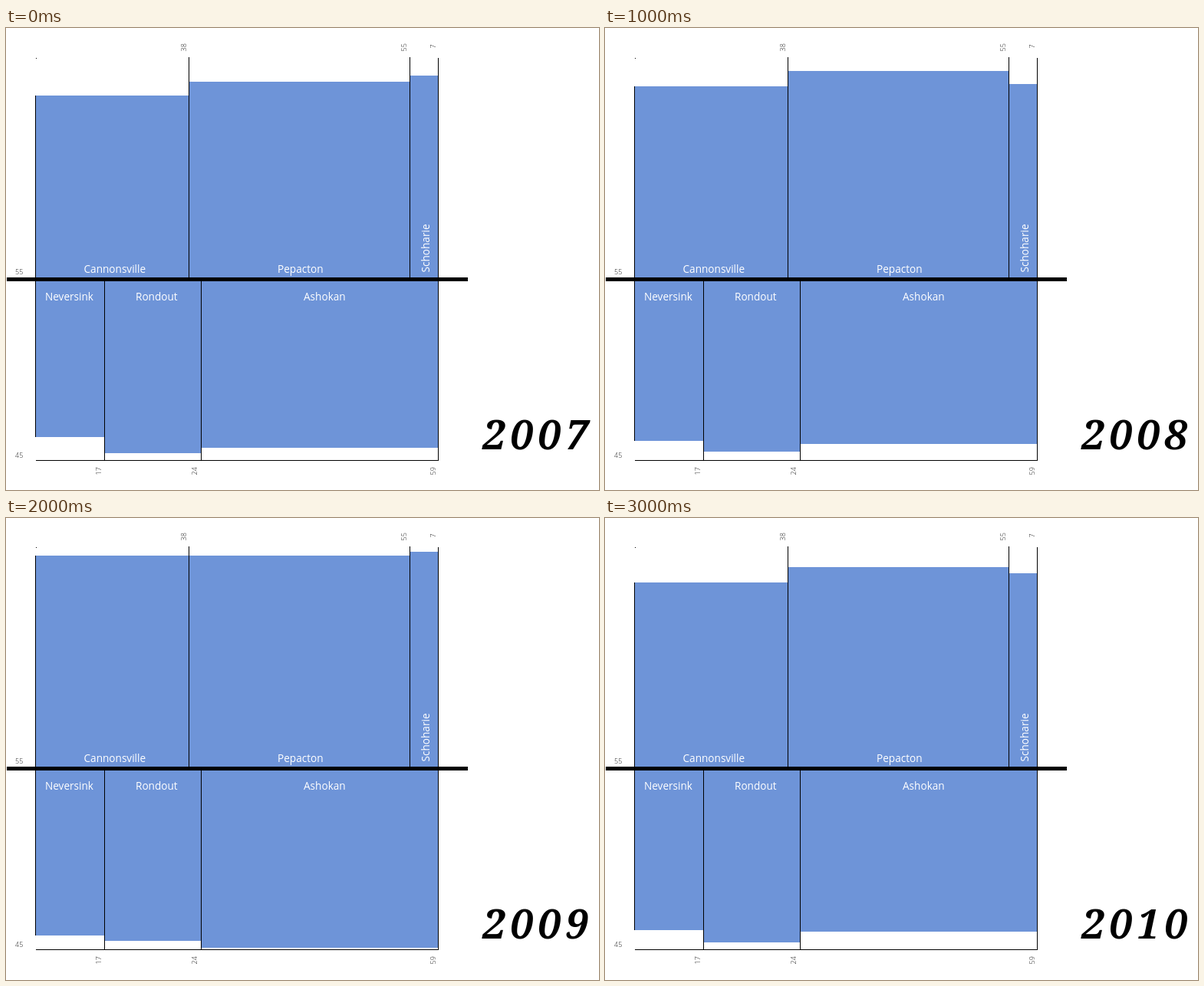
Recreate the animation shown at these times as an HTML page with a canvas. Size 773 by 602 pixels, loop 4 s.

```html
<!DOCTYPE html>
<html lang="en">
<head>
<meta charset="utf-8">
<title>Reservoir levels</title>
<style>
  html, body { margin: 0; width: 100%; height: 100%; overflow: hidden; background: #fff; }
  canvas { display: block; }
</style>
</head>
<body>
<canvas id="stage" width="773" height="602"></canvas>
<script>
const ctx = document.getElementById('stage').getContext('2d');
const HOLD = 1000;
const BLUE = '#6e94d8';
const LABEL = '13.6px "Open Sans", "Noto Sans", sans-serif';
const SMALL = '300 9px "Open Sans", "Noto Sans", sans-serif';
const YEAR = 'italic bold 53px "Noto Serif", "Liberation Serif", serif';

// tops: bar edges above the axis, bottoms: bar edges below it, dy: page offset
const years = [
  { year: 2007, tops: [88, 70, 62], bottoms: [533, 554, 547], dy: 0 },
  { year: 2008, tops: [76, 56, 73], bottoms: [538, 552, 542], dy: 0 },
  { year: 2009, tops: [49, 49, 44], bottoms: [544, 551, 560], dy: -1 },
  { year: 2010, tops: [84, 64, 72], bottoms: [537, 553, 539], dy: -1 }
];
const upperX = [39, 238, 526, 563];
const lowerX = [39, 128, 254, 563];

function box(x0, y0, x1, y1, color = '#000') {
  ctx.fillStyle = color;
  ctx.fillRect(x0, y0, x1 - x0, y1 - y0);
}

function text(str, x, y, font, color, upright = false) {
  ctx.save();
  ctx.translate(x, y);
  if (upright) ctx.rotate(-Math.PI / 2);
  ctx.font = font;
  ctx.fillStyle = color;
  ctx.fillText(str, 0, 0);
  ctx.restore();
}

const label = (str, x, y, upright) => text(str, x, y, LABEL, '#fff', upright);
const small = (str, x, y, upright) => text(str, x, y, SMALL, '#222', upright);

function draw({ year, tops, bottoms, dy }) {
  box(0, 0, 773, 602, '#fff');
  const axis = 327 + dy;
  tops.forEach((y, i) => box(upperX[i], y, upperX[i + 1], axis, BLUE));
  bottoms.forEach((y, i) => box(lowerX[i], axis, lowerX[i + 1], y, BLUE));
  box(38, tops[0], 39, bottoms[0]);

  ctx.save();
  ctx.translate(0, dy);
  for (const x of [238, 526]) box(x, 38, x + 1, 327);
  for (const x of [128, 254]) box(x, 327, x + 1, 563);
  box(563, 39, 564, 564);
  box(39, 563, 564, 564);
  box(39, 39, 40, 40);
  box(1, 325, 602, 330);

  label('Cannonsville', 101.5, 319);
  label('Pepacton', 354, 319);
  label('Schoharie', 552, 318.5, true);
  label('Neversink', 51, 355);
  label('Rondout', 169, 355);
  label('Ashokan', 388, 355);

  small('55', 12, 321);
  small('45', 12, 560);
  small('38', 235, 30.5, true);
  small('55', 522, 30.5, true);
  small('7', 560, 26.5, true);
  small('17', 124, 582.5, true);
  small('24', 249, 582.5, true);
  small('59', 560, 582.5, true);

  ctx.letterSpacing = '6.4px';
  text(String(year), 621, 549, YEAR, '#000');
  ctx.restore();
}

function tick() {
  draw(years[Math.floor(performance.now() / HOLD) % years.length]);
  requestAnimationFrame(tick);
}
tick();
</script>
</body>
</html>
```
